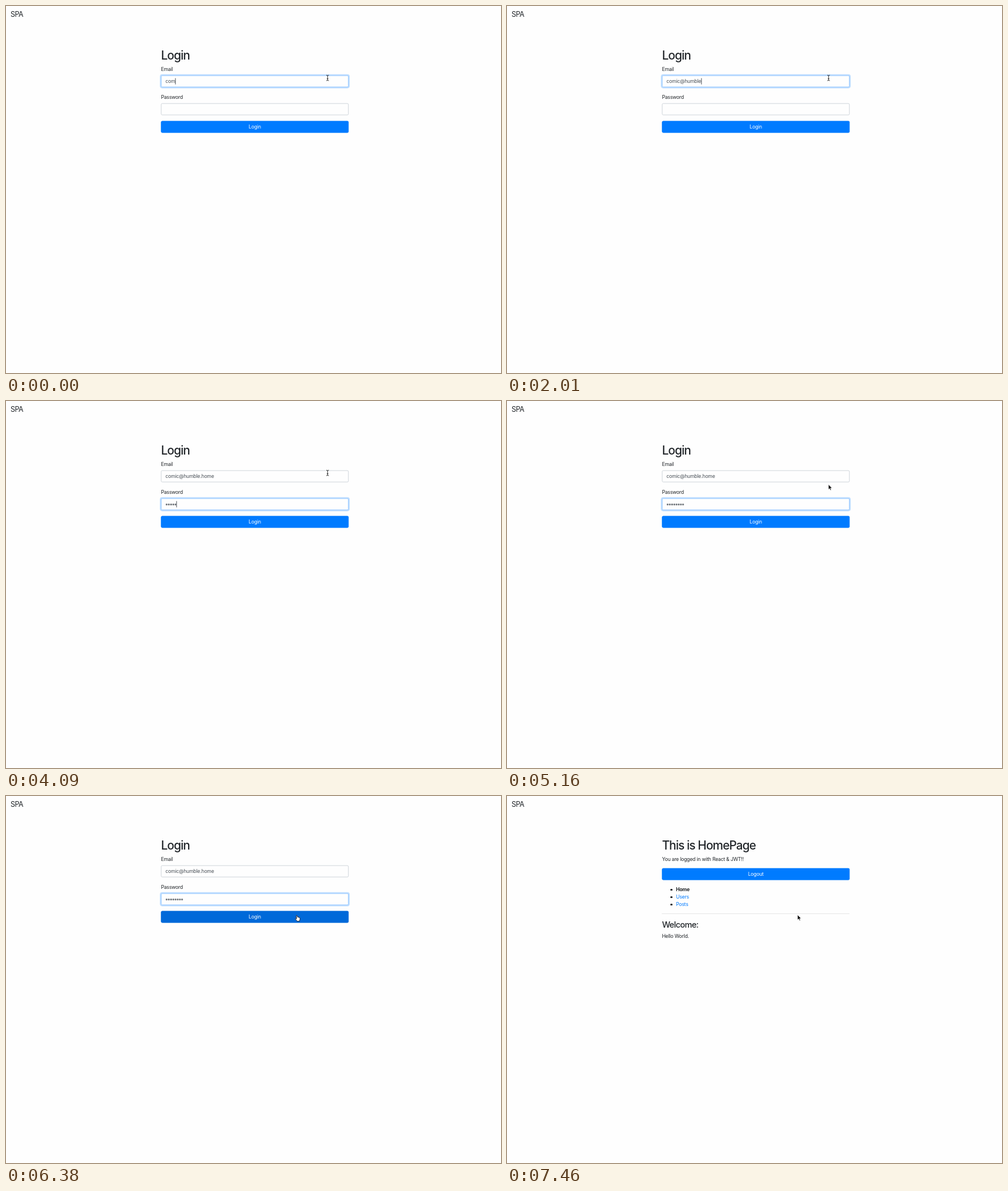
An HTML page for the animation above (8000 ms loop, 870 by 644 pixels).

```html
<!DOCTYPE html>
<html lang="en">
<head>
<meta charset="utf-8">
<title>SPA</title>
<style>
  html, body { margin: 0; width: 100%; height: 100%; overflow: hidden; background: #fefefe; }
  #stage {
    position: relative; width: 870px; height: 644px; overflow: hidden;
    font: 8.66px/20px Inter, sans-serif; letter-spacing: -.024em; color: #212529;
  }
  #stage [hidden] { display: none; }
  .text, .box, .hr, #spinner { position: absolute; left: 272.4px; white-space: pre; }
  .text { margin-top: -10px; }
  .brand { left: 8px; font-size: 12.4px; letter-spacing: -.04em; }
  .h1, .h3 { font-weight: 500; letter-spacing: -.043em; }
  .h1 { font-size: 20.8px; }
  .h3 { font-size: 14.5px; }
  .box {
    box-sizing: border-box; left: 272px; width: 330px; height: 21px; padding-left: 7px;
    border: 1px solid #ced4da; border-radius: 2.3px; line-height: 19px; color: #495057;
    display: flex; align-items: center; transform: translate(.3px, .6px);
  }
  .box.focus { border-color: #80bdff; box-shadow: 0 0 0 1.8px rgba(0, 123, 255, .25); }
  .button { padding: 0; justify-content: center; background: #007bff; border-color: #007bff; color: #fff; }
  .button.hover { background: #0069d9; border-color: #0069d9; }
  .button.focus { border-color: #0062cc; box-shadow: 0 0 0 1.8px rgba(0, 123, 255, .5); }
  .caret { width: 1px; height: 10.5px; background: #495057; }
  #dots {
    height: 4px; margin-top: 1.5px;
    background: radial-gradient(circle at 2px 2px, #495057 1.25px, transparent 1.7px) 0 0 / 3.88px 4px;
  }
  .item { left: 297px; }
  .item::before {
    content: ""; position: absolute; left: -9.7px; top: 8.5px;
    width: 3.2px; height: 3.2px; border-radius: 50%; background: #212529;
  }
  .link { color: #007bff; }
  .hr { top: 206px; width: 330px; height: 1px; background: #e6e6e6; }
  #spinner {
    top: 225.5px; width: 9px; height: 9px;
    background: conic-gradient(from 40deg, transparent 170deg, #aaa 180deg, #111 270deg 360deg);
    -webkit-mask: radial-gradient(circle, transparent 2.1px, #000 2.6px 3.8px, transparent 4.3px);
    mask: radial-gradient(circle, transparent 2.1px, #000 2.6px 3.8px, transparent 4.3px);
  }
  svg { position: absolute; left: 0; top: 0; width: 870px; height: 644px; }
</style>
</head>
<body>
<div id="stage">
  <div class="text brand" style="top:14.7px">SPA</div>

  <div id="login">
    <div class="text h1" style="top:86.8px">Login</div>
    <div class="text" style="top:110.8px">Email</div>
    <div class="box" id="email" style="top:121px"><span id="typed"></span><i class="caret"></i></div>
    <div class="text" style="top:159.5px">Password</div>
    <div class="box" id="password" style="top:170px"><span id="dots"></span><i class="caret"></i></div>
    <div class="box button" id="submit" style="top:201px">Login</div>
    <div id="spinner"></div>
  </div>

  <div id="home" hidden>
    <div class="text h1" style="top:86.8px">This is HomePage</div>
    <div class="text" style="top:110.8px">You are logged in with React &amp; JWT!!</div>
    <div class="box button" style="top:126px">Logout</div>
    <div class="text item" style="top:164.4px"><b>Home</b></div>
    <div class="text item link" style="top:177.4px">Users</div>
    <div class="text item link" style="top:190.3px">Posts</div>
    <div class="hr"></div>
    <div class="text h3" style="top:226px">Welcome:</div>
    <div class="text" style="top:245.6px">Hello World.</div>
  </div>

  <svg viewBox="0 0 870 644">
    <g id="pointer" stroke-linejoin="round">
      <path id="beam" fill="none" stroke="#111" stroke-width=".9"
        d="M-2.2-4.8Q0-4.8 0-3.6V3.6Q0 4.8-2.2 4.8M2.2-4.8Q0-4.8 0-3.6M2.2 4.8Q0 4.8 0 3.6M-1.3 1.4H1.3"/>
      <path id="arrow" fill="#000" stroke="#fff" stroke-width=".7"
        d="M0 0V8.9L2 7L3.4 10.2L4.9 9.5L3.5 6.4H6.3Z"/>
      <path id="hand" fill="#fff" stroke="#000" stroke-width=".8"
        d="M-.9 .8Q0-.4 .9 .8L1.5 3.4Q2.4 2.8 3 3.7Q3.9 3.2 4.4 4.1Q5.6 3.9 5.7 5.2V7.2L4.9 9.2V10.4H.5L-.3 8.9L-2.5 6.4Q-2.6 5.2-1.3 5.6L-.2 6.3Z"/>
    </g>
  </svg>
</div>

<script>
const $ = id => document.getElementById(id);
const LOOP = 8000;
const ADDRESS = "comic@humble.home";

// Each track is a list of [start time, value...]; the latest started entry holds.
const LETTERS = [[0, 3], [180, 4], [470, 5], [630, 6], [790, 7], [1090, 8], [1420, 10],
  [1710, 11], [2010, 12], [2160, 13], [2330, 14], [2480, 16], [2640, 17]];
const DOTS = [3330, 3480, 3650, 3800, 4090, 4250, 4420, 4710];
const FOCUS = [[0, "email"], [3150, "password"], [6390, "submit"]];
const POINTER = [[0, "beam", 565.2, 126.2], [5160, "arrow", 565, 146.5], [5330, "beam", 553, 174],
  [5500, "arrow", 532, 194], [5670, "hand", 514, 207], [5850, "hand", 511, 209.3],
  [6560, "arrow", 510.7, 208.6]];

const at = (track, t) => track.filter(step => step[0] <= t).pop();
const within = (t, from, to) => t >= from && t < to;

function draw(t) {
  $("login").hidden = t >= 7460;
  $("home").hidden = t < 7460;

  $("typed").textContent = ADDRESS.slice(0, at(LETTERS, t)[1]);
  $("dots").style.width = DOTS.filter(start => start <= t).length * 3.88 + "px";

  const focus = at(FOCUS, t)[1];
  const blink = within(t, 5160, 5670) || t >= 6210;
  for (const id of ["email", "password", "submit"]) {
    const box = $(id);
    box.classList.toggle("focus", id === focus);
    const caret = box.querySelector(".caret");
    if (caret) caret.hidden = id !== focus || blink;
  }
  $("submit").classList.toggle("hover", t >= 5670);

  $("spinner").hidden = t < 6560;
  $("spinner").style.transform = `rotate(${Math.floor((t - 7280) / 180) * 60}deg)`;

  const [, shape, x, y] = at(POINTER, t);
  $("pointer").setAttribute("transform", `translate(${x} ${y})`);
  for (const id of ["beam", "arrow", "hand"]) {
    $(id).style.display = id === shape ? "" : "none";
  }
}

function tick() {
  draw(performance.now() % LOOP);
  requestAnimationFrame(tick);
}
tick();
</script>
</body>
</html>
```
